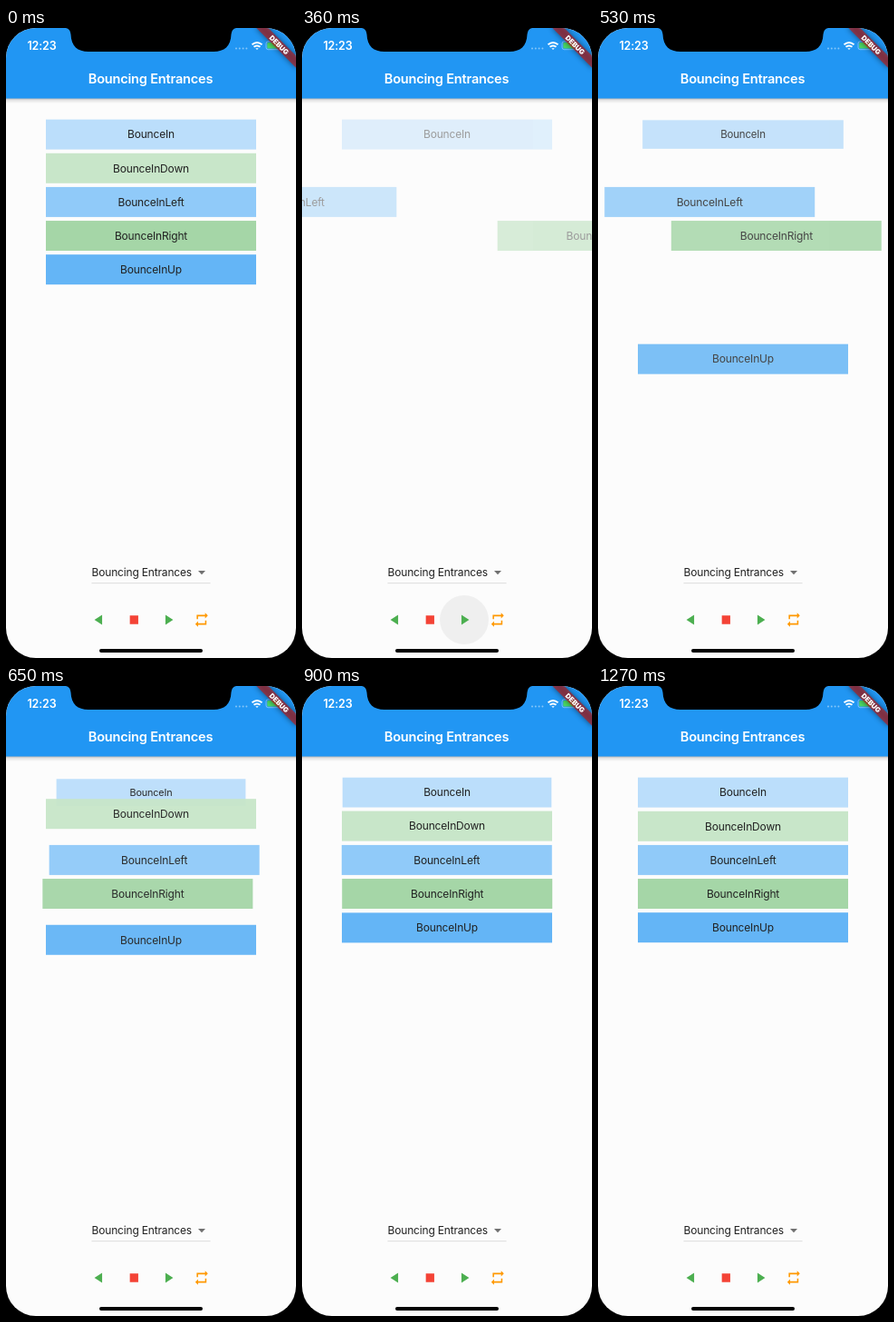
Recreate the animation shown at these times as an HTML page. Size 320x693 px, loop 1.3 s.

```html
<!DOCTYPE html>
<html lang="en">
<head>
<meta charset="utf-8">
<title>Bouncing Entrances</title>
<style>
  html, body { margin: 0; width: 100%; height: 100%; overflow: hidden; background: #000; }
  svg { display: block; }
  text { font: 12px Inter, sans-serif; letter-spacing: -.17px; fill: #212121; }
  .mid { text-anchor: middle; }
  .bar { fill: #fff; font-weight: 600; }
</style>
</head>
<body>
<svg width="320" height="693" viewBox="0 0 320 693">
  <defs>
    <clipPath id="screen"><rect width="320" height="693" rx="33"/></clipPath>
    <clipPath id="list"><rect y="77" width="320" height="498"/></clipPath>
    <linearGradient id="shade" x2="0" y2="1">
      <stop stop-opacity=".3"/><stop offset=".4" stop-opacity=".1"/><stop offset="1" stop-opacity="0"/>
    </linearGradient>
    <filter id="blur" x="-20%" y="-200%" width="140%" height="500%"><feGaussianBlur stdDeviation="3"/></filter>
  </defs>
  <g clip-path="url(#screen)">
    <rect width="320" height="693" fill="#fcfcfc"/>
    <g id="boxes" clip-path="url(#list)"></g>

    <!-- app bar and status bar -->
    <rect y="77" width="320" height="6" fill="url(#shade)"/>
    <rect width="320" height="77.5" fill="#2196f3"/>
    <text class="bar mid" x="159.5" y="61" style="font-size:14.6px;letter-spacing:-.22px">Bouncing Entrances</text>
    <text class="bar" x="23.5" y="23.5" style="font-size:12.5px">12:23</text>
    <path d="M254 22.5h12" stroke="#fff" stroke-opacity=".45" stroke-width="2" stroke-linecap="round" stroke-dasharray="0 3.8"/>
    <g fill="none" stroke="#fff" stroke-width="1.9">
      <path d="M271.5 18.3q5.5-4.6 11 0M273.5 20.8q3.5-2.8 7 0"/>
      <path d="M275.3 22.2h3.4l-1.7 1.8z" fill="#fff" stroke="none"/>
    </g>
    <rect x="287" y="14.7" width="17" height="9" rx="2.4" fill="none" stroke="#fff" stroke-opacity=".5" stroke-width=".8"/>
    <rect x="288.3" y="16" width="14" height="6.4" rx="1.2" fill="#4cd964"/>
    <g transform="translate(320 0) rotate(45)">
      <rect x="-31" y="21.6" width="62" height="9.3" filter="url(#blur)" opacity=".5"/>
      <rect x="-31" y="21.6" width="62" height="9.3" fill="#b71c1c" opacity=".66"/>
      <text class="bar mid" y="29.1" style="font-size:7.6px;font-weight:900;letter-spacing:0">DEBUG</text>
    </g>
    <path d="M66 0Q71 1 71.5 7C72 20 79 26 91 26H229C241 26 248 20 248.5 7Q249 1 254 0Z"/>

    <!-- dropdown and controls -->
    <text x="94.5" y="603">Bouncing Entrances</text>
    <path d="M212 597h8l-4 4.2z" fill="#707070"/>
    <path d="M94.5 610.7h131" stroke="#d8d8d8" stroke-width=".9"/>
    <circle id="ripple" cx="179" cy="651" r="27"/>
    <g id="icons"></g>
    <rect x="103" y="683" width="114" height="4" rx="2"/>
  </g>
</svg>
<script>
const W = 320, H = 693, UNIT = 320 / 414;
const $ = id => document.getElementById(id);

const play = 'M8 5v14l11-7z';
$('icons').innerHTML = [
  [103, play, '#4caf50', -1],
  [141.3, 'M6 6h12v12H6z', '#f44336', 1],
  [179, play, '#4caf50', 1],
  [215.8, 'M7 7h10v3l4-4-4-4v3H5v6h2V7zm10 10H7v-3l-4 4 4 4v-3h12v-6h-2v4z', '#ff9800', 1]
].map(([x, d, fill, dir]) =>
  `<path d="${d}" fill="${fill}" transform="translate(${x} 651) scale(${dir * UNIT} ${UNIT}) translate(-12 -12)"/>`
).join('');

// name, colour, direction the box comes from
const items = [
  ['BounceIn', '#bbdefb', 0, 0],
  ['BounceInDown', '#c8e6c9', 0, -1],
  ['BounceInLeft', '#90caf9', -1, 0],
  ['BounceInRight', '#a5d6a7', 1, 0],
  ['BounceInUp', '#64b5f6', 0, 1]
];
const rowY = i => 117.1 + i * 37.15;
$('boxes').innerHTML = items.map(([name, fill]) =>
  `<g><rect x="-116" y="-16.5" width="232" height="33" fill="${fill}"/><text class="mid" y="4.3">${name}</text></g>`
).join('');
const boxes = [...$('boxes').children];

// cubic-bezier(.215, .61, .355, 1)
function ease(x) {
  const bez = (u, a, b) => 3 * (1 - u) ** 2 * u * a + 3 * (1 - u) * u * u * b + u ** 3;
  let lo = 0, hi = 1;
  for (let i = 0; i < 20; i++) {
    const mid = (lo + hi) / 2;
    if (bez(mid, .215, .355) < x) lo = mid; else hi = mid;
  }
  return bez(lo, .61, 1);
}

const clamp = x => Math.min(1, Math.max(0, x));

function track(t, stops, values) {
  let i = 0;
  while (i < stops.length - 2 && t >= stops[i + 1]) i++;
  const p = ease(clamp((t - stops[i]) / (stops[i + 1] - stops[i])));
  return values[i] + (values[i + 1] - values[i]) * p;
}

const run = (count, ms) => Array(count).fill(ms);
const holds = [120, ...run(6, 40), 50, ...run(3, 40), 50, 40, 30, 50,
  ...run(5, 40), 50, ...run(5, 40), 50, 40, 30, 30];

function stepAt(ms) {
  let i = 0;
  while (ms >= holds[i] && i < holds.length - 1) ms -= holds[i++];
  return i ? i + 2 : 0;
}

function draw(step) {
  let t = Math.round(2.5625 * (step - 9) + 6) / 60;
  if (t <= 0 || t > 1) t = 1;
  const opacity = track(t, [0, .6], [0, 1]);
  const scale = track(t, [0, .2, .4, .6, .8, 1], [.3, 1.1, .9, 1.03, .97, 1]);
  items.forEach(([, , dx, dy], i) => {
    const far = dx ? W : H;
    const shift = track(t, [0, .6, .75, .9, 1], [far, -25 * UNIT, 10 * UNIT, -5 * UNIT, 0]);
    const size = dx || dy ? 1 : scale;
    boxes[i].setAttribute('transform',
      `translate(${160 + dx * shift} ${rowY(i) + dy * shift}) scale(${size})`);
    boxes[i].setAttribute('opacity', opacity);
  });
  const grow = clamp((step - 2) / 5);
  $('ripple').setAttribute('r', 10 + 17 * grow);
  $('ripple').setAttribute('opacity', .052 * grow * clamp((13 - step) / 4));
}

function tick() {
  draw(stepAt(performance.now() % 1300));
  requestAnimationFrame(tick);
}
tick();
</script>
</body>
</html>
```
